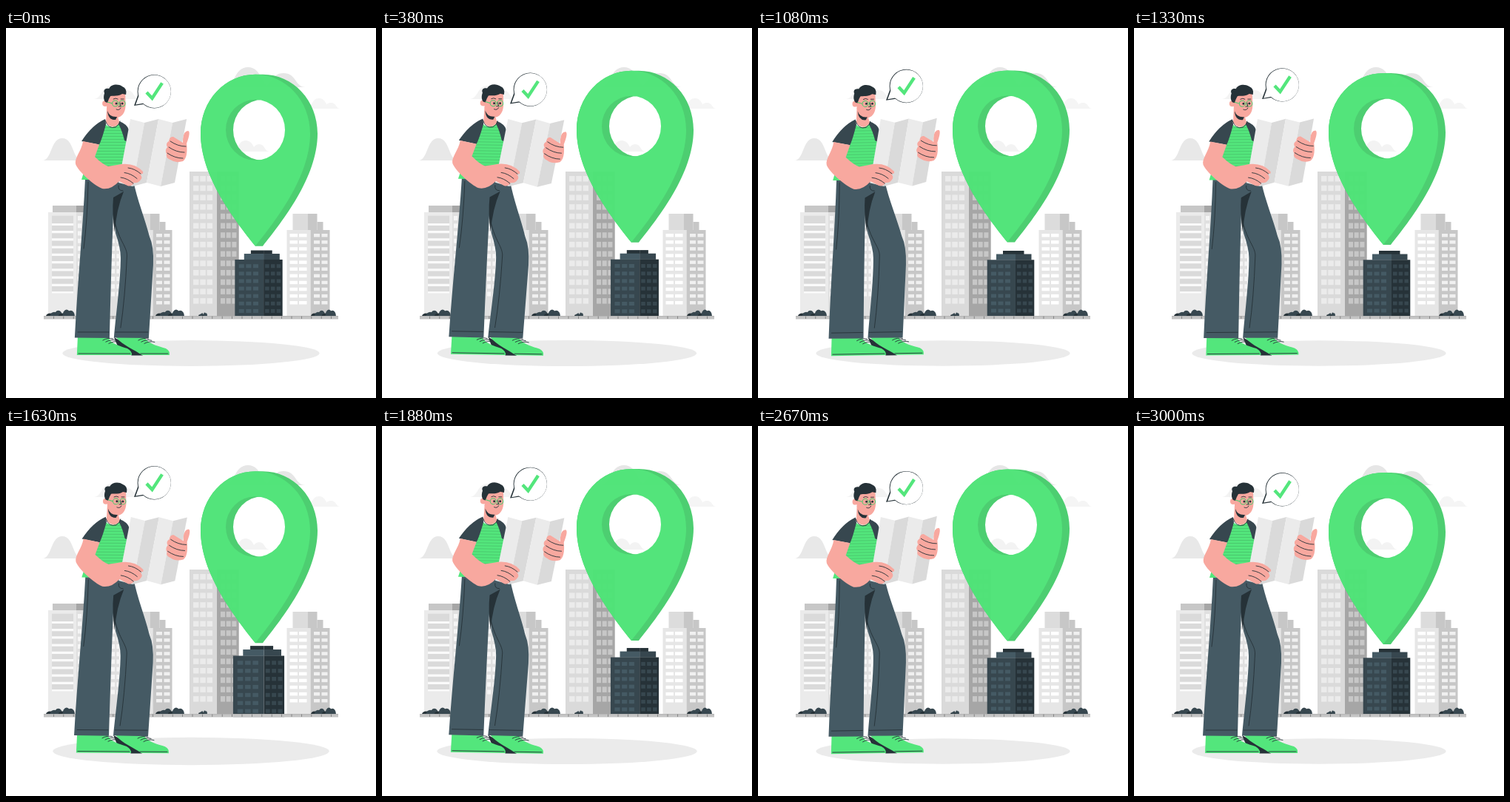
These frames come from a looping animation (500 px wide and 500 px high, 3.04 s). An HTML page:

```html
<!DOCTYPE html>
<html lang="en">
<head>
<meta charset="utf-8">
<title>Location found</title>
<style>
html, body { margin: 0; width: 100%; height: 100%; overflow: hidden; background: #fff; }
svg { display: block; width: 100%; height: 100%; }
.line { fill: none; stroke: #263238; stroke-width: .9; stroke-linecap: round; stroke-linejoin: round; }
.skin { fill: #f8a89f; }
.green { fill: #53e67c; }
.cloth { fill: #455a64; }
.slate { fill: #37474f; }
.dark { fill: #263238; }
</style>
</head>
<body>
<svg viewBox="0 0 500 500">
  <defs>
    <pattern id="stripes" width="8" height="4" patternUnits="userSpaceOnUse">
      <rect class="green" width="8" height="4"/>
      <rect y="2" width="8" height=".7" fill="#46bd68"/>
    </pattern>
  </defs>

  <ellipse id="shadow" cx="250" cy="439.5" rx="171.700" ry="17.2" fill="#ebebeb"/>
  <g id="clouds"></g>
  <g id="city"></g>
  <g id="office"></g>
  <g id="ground"></g>
  <g id="pin" opacity=".97" fill-rule="evenodd"></g>

  <g id="man">
    <!-- shoes -->
    <path class="dark" d="M146 418L152 432L170 442.500H185L176 434Z"/>
    <path class="green" d="M149 418H187C194 428 207 430 216 433Q222 436 221 442H184C174 435 158 429 149 418Z"/>
    <path class="green" d="M97 418H138C142 427 155 430 164 433Q171 437 170 442H96Z"/>
    <path class="line" d="M98 440H168M182 440H219"/>
    <g id="laces"></g>

    <!-- trousers -->
    <path class="cloth" d="M144 206H172C177 232 188 258 194 282Q200 295 199 320L193 419L146 418.500C149 385 155 340 155 310Q155 298 148 277Z"/>
    <path class="cloth" d="M107 203L152 207L158 222L146 230Q143 290 140 419L93 418.500C97 340 104 270 107 203Z"/>
    <path class="dark" d="M145 229L159 221Q149 245 147 276Q143 250 145 229Z"/>
    <path class="line" d="M111 208Q110 260 105 298M147 262C153 288 164 296 163.500 308Q161 365 155 405M97 411H139M148 411H192M152 213Q151 220 158 220"/>

    <!-- shirt -->
    <path class="green" d="M106 192L102 205H114L122 200Z"/>
    <path fill="url(#stripes)" d="M134 130Q143 138 153 129L166 152L163 186L142 192L118 176Z"/>
    <path class="slate" d="M134 123Q116 131 102 153L126 157.500Q130 149 135 130ZM153 126Q164 130 166 138L164 154L160 152Q157 139 152 130Z"/>
    <path class="skin" d="M136 107L135 127C140 136 150 135 153 127L150 117Z"/>
    <path class="line" d="M134 125Q138 137 148 134Q153 131 154 126"/>

    <!-- head -->
    <circle class="skin" cx="134" cy="102" r="4"/>
    <path class="skin" d="M136 90L161 88L161.500 105C161 115 156 121 149 121Q138 120 136 108Z"/>
    <path class="dark" d="M137 112Q140 121 150 120L148 124Q138 125 137 112Z"/>
    <path class="dark" d="M134 100C131 96 132 91 133 88C131 84 134 81 139 82C142 76 151 75 157 79Q164 82 162 90L157 89C151 93 145 91 141 92Q139 95 137 101Z"/>
    <path fill="none" stroke="#4acb6d" d="M143.500 102a4 4 0 1 0 8 0a4 4 0 1 0-8 0L137 100M153 102a4 4 0 1 0 8 0a4 4 0 1 0-8 0"/>
    <path class="line" d="M145 96Q148 94 151 96M155 96H159M154 101L155 106H152M149 110Q153 112 155 108"/>
    <circle class="dark" cx="149" cy="102" r="1.500"/>
    <circle class="dark" cx="157" cy="102" r="1.500"/>

    <g id="map"></g>

    <!-- arms and hands -->
    <path class="skin" d="M104 153L126 157.500L120 174Q130 184 138 187L150 185Q172 180 185 194Q186 198 181 197Q185 202 182 205Q179 210 173 209Q170 215 164 213L153 207Q142 219 130 217C119 213 97 193 94 184C92 176 102 166 104 153Z"/>
    <path class="skin" d="M239 150Q240 139 246 139Q250 140 244 156Q246 175 239 180Q229 183 222 178Q215 175 217 170Q214 165 218 161Q215 156 220 153Q221 146 226 147Q234 152 239 155Z"/>
    <g id="fingers"></g>
  </g>

  <g id="bubble">
    <path class="dark" d="M178.500 90L173 105L186 103Z"/>
    <circle class="dark" cx="200.300" cy="85.800" r="22.700"/>
    <path fill="#fff" d="M179.800 91L175.200 103.600L187 101.500Z"/>
    <circle cx="200.700" cy="85.900" r="22.200" fill="#fff"/>
    <path d="M190 87L197.500 95L211 74.500" fill="none" stroke="#53e67c" stroke-width="4.400"/>
  </g>
</svg>

<script>
const el = id => document.getElementById(id);
const fillIn = (id, ...parts) => el(id).innerHTML = parts.join('');
const repeat = (n, make) => Array.from({ length: n }, (_, i) => make(i)).join('');
const rect = (x, y, w, h, fill) => `<rect x="${x}" y="${y}" width="${w}" height="${h}" fill="${fill}"/>`;
const path = (d, fill) => `<path d="${d}" fill="${fill}"/>`;
const line = d => `<path class="line" d="${d}"/>`;
const grid = (x, y, w, h, dx, dy, cols, rows, fill) =>
  repeat(rows, r => repeat(cols, c => rect(x + c * dx, y + r * dy, w, h, fill)));

// Bell-shaped mound standing on the line y
const mound = (x, y, w, h, fill) => path(
  `M${x} ${y}C${x + w * .25} ${y} ${x + w * .2} ${y - h} ${x + w / 2} ${y - h}S${x + w * .75} ${y} ${x + w} ${y}Z`, fill);

fillIn('clouds',
  mound(49, 179, 54, 30, '#e8e8e8'),
  mound(118, 96, 50, 18, '#f3f3f3'), mound(145, 96, 36, 12, '#f3f3f3'),
  mound(294, 80, 66, 27, '#e6e6e6'), mound(345, 80, 60, 19, '#e6e6e6'),
  mound(405, 109, 36, 14, '#f5f5f5'), mound(426, 109, 26, 8, '#f5f5f5'),
  mound(305, 167, 38, 15, '#f3f3f3'), mound(328, 167, 28, 10, '#f3f3f3'));

// Stepped block with two window columns on each face
const block = x =>
  rect(x + 8, 251, 20, 22, '#dcdcdc') + rect(x + 28, 251, 13, 22, '#c7c7c7') +
  rect(x + 41, 262, 8, 11, '#c7c7c7') +
  rect(x, 273, 32, 116, '#e6e6e6') + rect(x + 32, 273, 26, 116, '#c7c7c7') +
  grid(x + 4, 278, 10.5, 4.5, 12.5, 9.1, 2, 11, '#fff') +
  grid(x + 36.5, 278, 8, 4.5, 10.5, 9.1, 2, 11, '#f0f0f0');

fillIn('city',
  rect(63, 240, 32, 9, '#c7c7c7'), rect(95, 240, 40, 9, '#a6a6a6'),
  rect(57, 249, 38, 140, '#ebebeb'), rect(95, 249, 58, 140, '#e0e0e0'),
  rect(62, 253.5, 29, 105, '#fafafa'), rect(62, 253.5, 29, 10.5, '#dadada'),
  grid(62, 267, 29, 7, 0, 10.25, 1, 9, '#dadada'),
  grid(97, 254, 5, 6, 7.5, 10.25, 8, 11, '#f5f5f5'),
  block(166.5), block(379.5),
  rect(248, 194, 37, 195, '#dadada'), rect(285, 194, 29.7, 195, '#a6a6a6'),
  grid(253, 200, 7.5, 7.5, 9.3, 12.7, 3, 14, '#ebebeb'),
  grid(290, 200, 6, 7.5, 7.7, 12.7, 3, 14, '#c7c7c7'));

// One storey of the office: front face left of the corner, side face right of it
const storey = (left, right, y, h, front, side) =>
  rect(left, y, 348 - left, h, front) + rect(348, y, right - 348, h, side);

fillIn('office',
  storey(331, 359.5, 301, 5, '#263238', '#263238'),
  storey(322, 369.5, 305.5, 8, '#455a64', '#37474f'),
  storey(309.7, 373.3, 313.3, 76, '#37474f', '#263238'),
  grid(315, 319.5, 7, 5, 9.5, 10, 3, 7, '#455a64'),
  grid(350, 319.5, 5.5, 5, 7.7, 10, 3, 7, '#37474f'));

// Overlapping leaves, tallest at two thirds of the width
const bush = (x, w, h) => repeat(6, i => {
  const size = w / 3.5, tall = h * (i == 4 ? 1 : .45 + .2 * (i % 3));
  return `<path class="${i % 3 ? 'slate' : 'dark'}" d="M${x + i * w / 7} 389.5a${size / 2} ${tall} 0 0 1 ${size} 0Z"/>`;
});

fillIn('ground',
  bush(54, 39, 9), bush(202, 39, 9), bush(260, 12, 5), bush(412, 34, 9),
  rect(51, 389, 398, 4.5, '#c4c4c4'), rect(51, 389, 398, .7, '#b0b0b0'),
  grid(64, 389.5, .8, 3.5, 13.4, 0, 29, 1, '#777'));

// Drop outline whose left and right halves may be pulled apart
const drop = (l, r) => `M${l} 295C${l - 26} 262 ${l - 74} 202 ${l - 74} 143C${l - 74} 98 ${l - 41} 63 ${l} 63` +
  `H${r}C${r + 41} 63 ${r + 74} 98 ${r + 74} 143C${r + 74} 202 ${r + 26} 262 ${r} 295Z`;
const hole = x => `M${x - 40} 138a40 41 0 1 0 80 0a40 41 0 1 0-80 0Z`;

fillIn('pin',
  path(drop(337, 347) + hole(347), '#48cd6d'),
  path(drop(337, 337) + hole(337), '#4ee477'));

// Zigzag folds: every second crease sits lower
const foldX = i => 168 + i * 19, foldY = i => i % 2 ? 128 : 123;
fillIn('map', repeat(4, i => path(
  `M${foldX(i)} ${foldY(i)}L${foldX(i + 1)} ${foldY(i + 1)}l-16 86L${foldX(i) - 16} ${foldY(i) + 86}Z`,
  i % 2 ? '#dadada' : '#ebebeb')));

fillIn('laces', repeat(6, i => {
  const x = 131 + i % 3 * 4 + (i > 2) * 48, y = 422 + i % 3 * 2.2;
  return line(`M${x} ${y}q7-4 14-2`);
}));

fillIn('fingers', repeat(3, i =>
  line(`M${165 - i * 5} ${189 + i * 6.5}q9 1 17 8`) + line(`M${222 - i * 2} ${153 + i * 8}q10 7 21 7`)));

// Repeating rules; p runs from 0 to 1 over one cycle
const lift = p => -10 * (1 - Math.abs(1 - 2 * p));
const sway = p => Math.asin(Math.sin(2 * Math.PI * p)) * 2 / Math.PI;
const bump = (p, from, peak, to) => Math.max(0, Math.min((p - from) / (peak - from), (to - p) / (to - peak)));
const beat = p => 1 + .1 * (bump(p, 0, .1, .3) + bump(p, .4, .5, .6));

const LOOP = 3040, STEPS = 73;
const move = (id, value) => el(id).setAttribute('transform', value);
const scale = (id, x, y, k) => move(id, `translate(${x} ${y}) scale(${k}) translate(${-x} ${-y})`);

function draw(now) {
  // The motion advances 24 times a second
  const step = Math.min(STEPS - 1, Math.floor((now % LOOP + 5) * 24 / 1000));
  const time = 17 + step * 41.4;
  const quick = time % 1500 / 1500, slow = time / 3000;
  move('pin', `translate(0 ${lift(quick)})`);
  move('bubble', `translate(0 ${lift(slow)})`);
  move('man', `rotate(${sway(quick)} 170 260)`);
  scale('shadow', 250, 439.5, beat(quick));
  scale('office', 341.5, 345, beat(quick));
}

const start = performance.now();
function tick() {
  draw(performance.now() - start);
  requestAnimationFrame(tick);
}
tick();
</script>
</body>
</html>
```
